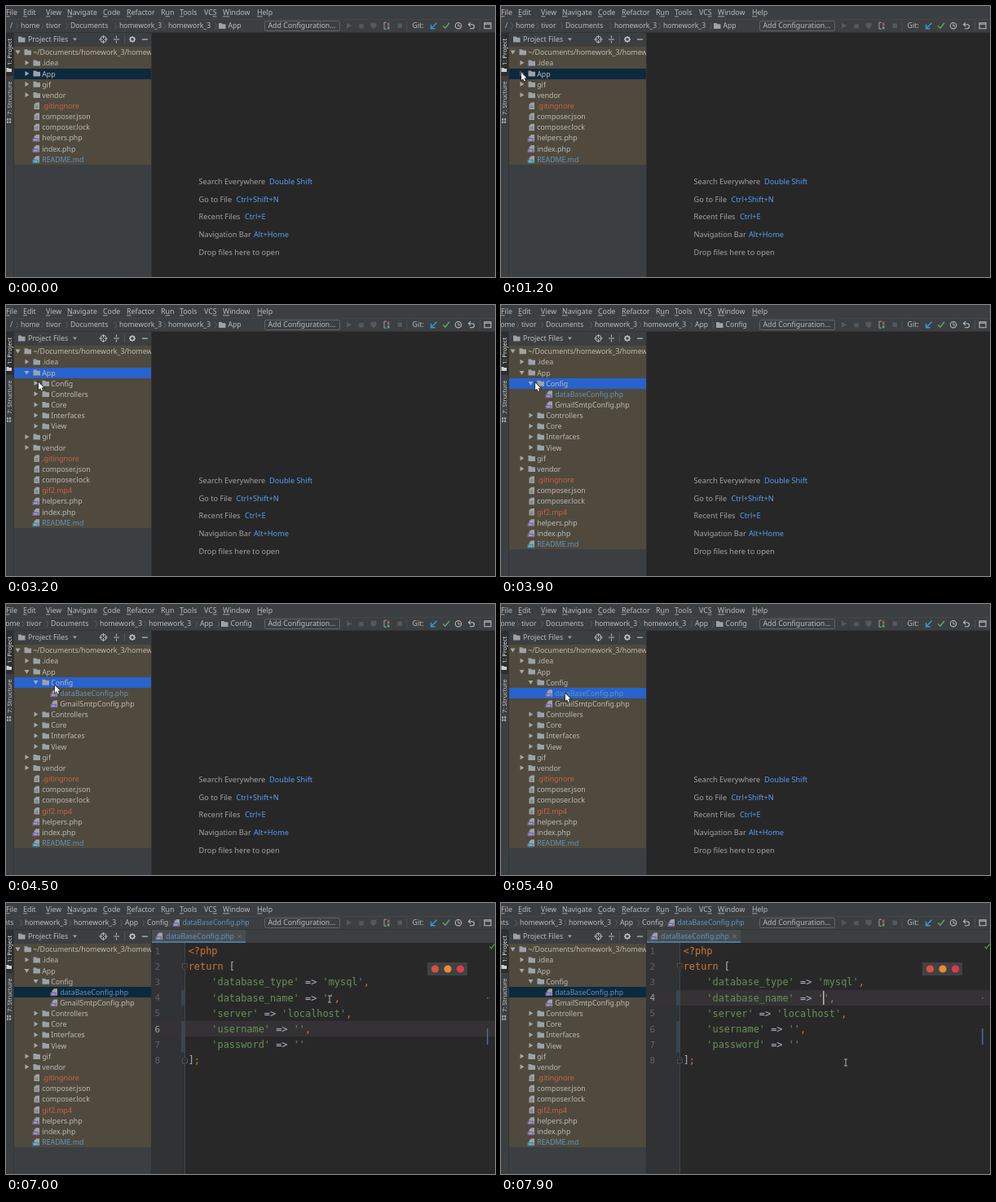
Animation, 600 px wide and 333 px high, one loop 8000 ms. Source, as an HTML page with a canvas:

```html
<!DOCTYPE html>
<html lang="en">
<head>
<meta charset="utf-8">
<title>Project tree and editor</title>
<style>
html, body { margin: 0; width: 600px; height: 333px; overflow: hidden; background: #3c3f41; }
canvas { display: block; }
</style>
</head>
<body>
<canvas id="stage" width="600" height="333"></canvas>
<script>
const g = document.getElementById('stage').getContext('2d');
const LOOP = 8000;
const UI = '"Noto Sans", "Open Sans", sans-serif';
const MONO = '"DejaVu Sans Mono", "Noto Sans Mono", monospace';
const PANEL = '#3c3f41', EDITOR = '#292829', GREY = '#bbbbbb', ICON = '#9da2a6', DIM = '#606366',
      BLUE = '#6194bf', RED = '#cc6049', LINK = '#589df6', PURPLE = '#7b68a8';

// Moments at which the interface changes
const T = { openApp: 1400, newFile: 2800, openConfig: 3700, pickFile: 5100,
            openEditor: 5500, fileCrumb: 5900, popup: 6300, clickLine4: 7450 };

// Pointer waypoints: time, x, y
const POINTER = [
  [700, -12, 96], [1200, 25, 82], [2500, 25, 82], [3000, 40, 95], [3800, 40, 95],
  [4300, 60, 100], [4600, 60, 100], [5000, 79, 110], [5900, 79, 110],
  [6800, 397, 118], [7500, 397, 118], [7850, 423, 196]
];

function rect(x, y, w, h, c) { g.fillStyle = c; g.fillRect(x, y, w, h); }

function text(s, x, mid, c = GREY, size = 8.8, font = UI) {
  g.font = `${size}px ${font}`;
  g.fillStyle = c;
  g.fillText(s, x, mid + size * 0.35);
}

function shape(d, x, y, c, line = 0) {
  g.save();
  g.translate(x, y);
  const p = new Path2D(d);
  if (line) { g.strokeStyle = c; g.lineWidth = line; g.stroke(p); }
  else { g.fillStyle = c; g.fill(p); }
  g.restore();
}

function disc(x, y, r, c, line = 0) {
  g.beginPath();
  g.arc(x, y, r, 0, 7);
  if (line) { g.strokeStyle = c; g.lineWidth = line; g.stroke(); }
  else { g.fillStyle = c; g.fill(); }
}

function clipped(x, y, w, h, draw) {
  g.save();
  g.beginPath();
  g.rect(x, y, w, h);
  g.clip();
  draw();
  g.restore();
}

const folder = (x, y) => shape('M0-3.5H3.5L4.5-2.3H8.5V3.5H0Z', x, y, ICON);

function file(x, y, badge) {
  shape('M4-4.5H8V4H1.5V-2Z', x, y, ICON);
  if (badge) {
    rect(x - 0.5, y, 7.5, 4.5, badge);
    rect(x + 1, y + 1.7, 4.5, 1, '#c9c3d6');
  } else {
    rect(x + 3, y - 0.5, 3.5, 0.8, '#66696b');
    rect(x + 3, y + 1.5, 3.5, 0.8, '#66696b');
  }
}

function drawMenu() {
  const items = [['File', 0], ['Edit', 21], ['View', 49], ['Navigate', 75], ['Code', 119],
    ['Refactor', 148], ['Run', 190, 1], ['Tools', 213], ['VCS', 243, 2], ['Window', 266], ['Help', 308]];
  for (const [s, x, key = 0] of items) {
    text(s, x, 8);
    const left = g.measureText(s.slice(0, key)).width;
    rect(x + left, 12.5, g.measureText(s[key]).width, 0.8, GREY);
  }
  rect(0, 16, 600, 1, '#434648');
}

function drawCrumbs(t) {
  const names = ['/', 'home', 'tivor', 'Documents', 'homework_3', 'homework_3', 'App', 'Config', 'dataBaseConfig.php'];
  const xs = [5, 18, 49, 79, 139, 199, 262, 289, 322];
  const [count, shift, icon] = t < T.openConfig ? [7, 0, folder]
    : t < T.openEditor ? [8, -24, folder]
    : t < T.fileCrumb ? [8, -13, null]
    : [9, -116, (x, y) => file(x, y, PURPLE)];
  clipped(0, 17, 314, 15, () => {
    for (let i = 0; i < count; i++) {
      const x = xs[i] + shift, last = i === count - 1 && icon;
      if (i) shape('M0-4L2.2 0L0 4', x - 5.5, 24.5, '#606467', 0.8);
      if (last) icon(x - 1, 24.5);
      text(names[i], x + (last ? 10.5 : 0), 24.3, i === 8 ? BLUE : GREY, 8.6);
    }
  });
}

function drawToolbar() {
  g.strokeStyle = '#626567';
  g.lineWidth = 1;
  g.beginPath();
  g.roundRect(317.5, 18.5, 92, 12, 2);
  g.stroke();
  text('Add Configuration...', 321.5, 24.2);
  const off = '#55595c';
  shape('M-3-3.5L3.5 0L-3 3.5Z', 421, 24.2, off);
  disc(436, 24.7, 2.8, off);
  shape('M-3.5-3L3.5 3M3.5-3L-3.5 3M-3.5 0H3.5', 436, 24.7, off, 0.8);
  shape('M-3.5-3.5H3.5V1L0 4L-3.5 1Z', 451, 24.2, off);
  shape('M-3-4V4M-3-4H0M-3 4H0', 467, 24.2, ICON, 1);
  rect(468, 20.5, 2.5, 4, '#a85a56');
  rect(468, 25.5, 2.5, 3, '#59a869');
  rect(480.5, 21.5, 5.5, 5.5, off);
  rect(491.5, 19, 1, 11, '#4b4f51');
  text('Git:', 498.5, 24.2);
  shape('M3.5-3.5L-3 3M-3.5-1.5V3.5H1.5', 525, 24.2, '#3c9ad6', 1.4);
  shape('M-4 0L-1 3L4-3.5', 540, 24.2, '#5aa85c', 1.5);
  disc(555, 24.2, 3.7, GREY, 1.1);
  shape('M0-2.5V.5H2.2', 555, 24.2, GREY, 1);
  shape('M-3.5-1.5H1A2.5 2.5 0 0 1 1 3.5H-2M-1-4L-3.5-1.5L-1 1', 571, 24.2, GREY, 1.1);
  rect(581, 19, 1, 11, '#4b4f51');
  shape('M-4-3.5H4V3.5H-4ZM-4-2H4', 591, 24.2, GREY, 1.1);
  rect(0, 32, 600, 1, '#323435');
}

function sideLabel(s, bottom, c) {
  g.save();
  g.translate(4, bottom);
  g.rotate(-Math.PI / 2);
  text(s, 0, 0, c, 7.6);
  g.restore();
}

function drawSidebar() {
  rect(0, 33, 9, 53, '#2c2e2f');
  sideLabel('1: Project', 73, '#e6e6e6');
  shape('M0-2.5H2.5L3.3-1.5H6.5V2.5H0Z', 0.5, 78.5, '#d0d0d0');
  sideLabel('7: Structure', 134, '#c8c8c8');
  for (const [x, y] of [[1, 138], [4, 138], [1, 141.5], [4, 141.5]]) rect(x, y, 2.2, 2.5, ICON);
  rect(9, 33, 1, 300, '#323435');
}

function drawPanelHead() {
  folder(15, 41);
  text('Project Files', 27, 41);
  shape('M-2.5-1.5H2.5L0 1.8Z', 84.5, 41, ICON);
  disc(119.5, 41, 3.7, GREY, 1);
  shape('M-5 0H-1M1 0H5M0-5V-1M0 1V5', 119.5, 41, GREY, 1);
  shape('M-3.5 0H3.5M0-4.5V-1.5M0 4.5V1.5', 135.5, 41, GREY, 1);
  rect(145, 36, 1, 10, '#515456');
  disc(155, 41, 2.5, GREY, 1.6);
  shape('M-4 0H-2.5M4 0H2.5M0-4V-2.5M0 4V2.5M-2.8-2.8L-2-2M2.8 2.8L2 2M-2.8 2.8L-2 2M2.8-2.8L2-2', 155, 41, GREY, 1.3);
  rect(167, 40.5, 7, 1.2, GREY);
}

// Row: label, depth, kind, text colour, expanded
function treeRows(t) {
  const rows = [['~/Documents/homework_3/homework_3', 0, 'dir', GREY, true], ['.idea', 1, 'dir'],
                ['App', 1, 'dir', GREY, t >= T.openApp]];
  if (t >= T.openApp) {
    const config = t >= T.openConfig;
    rows.push(['Config', 2, 'dir', GREY, config]);
    if (config) rows.push(['dataBaseConfig.php', 3, 'php', BLUE], ['GmailSmtpConfig.php', 3, 'php']);
    for (const s of ['Controllers', 'Core', 'Interfaces', 'View']) rows.push([s, 2, 'dir']);
  }
  rows.push(['gif', 1, 'dir'], ['vendor', 1, 'dir'], ['.gitingnore', 1, 'txt', RED],
            ['composer.json', 1, 'txt'], ['composer.lock', 1, 'txt']);
  if (t >= T.newFile) rows.push(['gif2.mp4', 1, 'txt', RED]);
  rows.push(['helpers.php', 1, 'php'], ['index.php', 1, 'php'], ['README.md', 1, 'md', BLUE]);
  return rows;
}

function drawTree(t) {
  const step = 13.16, rows = treeRows(t);
  const chosen = t < T.openConfig ? 'App' : t < T.pickFile ? 'Config' : 'dataBaseConfig.php';
  const focused = t >= T.openApp && t < T.openEditor;
  const badges = { php: PURPLE, md: '#3d8fb0' };
  clipped(10, 50, 168, 283, () => {
    rect(10, 50, 168, Math.round(rows.length * step), '#4f4a3d');
    rows.forEach(([label, depth, kind, color = GREY, open], i) => {
      const y = 57.1 + i * step, x = 22 + depth * 11;
      if (label === chosen) rect(10, Math.round(y - 6.6), 168, 13, focused ? '#2862cc' : '#0d293e');
      if (kind === 'dir') {
        shape(open ? 'M-3-2H3L0 2.8Z' : 'M-2-3L2.8 0L-2 3Z', x - 7.5, y - 0.5, '#a5a7a8');
        folder(x + 0.5, y - 0.3);
      } else file(x, y, badges[kind]);
      text(label, x + 11.2, y, color);
    });
  });
  rect(178, 33, 1, 300, '#2f3132');
}

function drawHints() {
  rect(179, 33, 421, 300, '#272727');
  const hints = [['Search Everywhere', 'Double Shift', 323], ['Go to File', 'Ctrl+Shift+N', 282.5],
    ['Recent Files', 'Ctrl+E', 293], ['Navigation Bar', 'Alt+Home', 304], ['Drop files here to open']];
  hints.forEach(([label, key, x], i) => {
    const y = 216 + i * 21.6;
    text(label, 236.5, y, '#a3a3a3', 9.2);
    if (key) text(key, x, y, LINK, 9.2);
  });
}

const CODE = ['<?php', 'return [', "    'database_type' => 'mysql',", "    'database_name' => '',",
  "    'server' => 'localhost',", "    'username' => '',", "    'password' => ''", '];'];
const PITCH = 7.165, CODE_X = 223.7;
const lineY = n => 59 + (n - 1) * 19.15;

function drawCode(s, y) {
  let col = 0;
  for (const part of s.split(/('[^']*'|,|;|<\?php|return)/)) {
    const color = part[0] === "'" ? '#6a8f59' : /^(,|;|<|return)/.test(part) ? '#cc7832' : '#a9b7c6';
    text(part, CODE_X + col * PITCH, y, color, 11.9, MONO);
    col += part.length;
  }
}

function drawEditor(t) {
  const clicked = t >= T.clickLine4;
  const current = clicked ? 4 : 6;
  rect(179, 33, 421, 16, PANEL);
  rect(179, 33, 115, 16, '#484c4e');
  rect(179, 47, 115, 2, '#4a7a9c');
  file(184, 41, PURPLE);
  text('dataBaseConfig.php', 196, 41, BLUE);
  shape('M-2-2L2 2M2-2L-2 2', 286.5, 41, '#777b7e', 0.8);

  rect(179, 49, 421, 284, EDITOR);
  rect(179, 49, 40, 284, '#303234');
  rect(179, Math.round(lineY(current) - 9.5), 421, 19, '#343234');
  rect(215, lineY(4) - 9.5, 4, 19.2, '#374752');
  rect(215, lineY(6) - 9.5, 4, 38.3, '#374752');
  rect(219, 49, 1, 284, '#424547');
  for (const [n, d] of [[2, 'M-3-3.5H3V1L0 4L-3 1Z'], [8, 'M-3 3.5H3V-1L0-4L-3-1Z']]) {
    shape(d, 219.5, lineY(n), EDITOR);
    shape(d + 'M-1.5 0H1.5', 219.5, lineY(n), '#585b5d', 0.8);
  }
  CODE.forEach((s, i) => {
    const y = lineY(i + 1);
    text(String(i + 1), 182.5, y, i + 1 === current ? '#a4a3a3' : DIM, 11, MONO);
    drawCode(s, y);
  });

  // The caret blinks every half second, restarting on a click
  const since = t - (clicked ? T.clickLine4 : T.openEditor);
  if (since % 1000 < 500) {
    const col = CODE[current - 1].indexOf("''") + 1;
    rect(CODE_X + col * PITCH - 0.5, lineY(current) - 8.5, 1.3, 17, '#d0d0d0');
  }

  rect(590, 154, 1.5, 20, '#4a6a9a');
  rect(590, 116, 2, 1.5, '#4a6a9a');
  if (t < T.fileCrumb) {
    shape('M-3 0Q0-4 3 0Q0 4-3 0Z', 596.5, 53.5, ICON, 0.9);
    disc(596.5, 53.5, 1, ICON);
  } else shape('M-3 0L-1 2.5L3-3', 596.5, 53.5, '#4f8f4a', 1.3);

  if (t >= T.popup) {
    rect(517, 73, 49, 16, '#3f4244');
    ['#d9503f', '#f08a2c', '#e0394a'].forEach((c, i) => disc(526.5 + i * 15.5, 81, 4.6, c));
  }
}

function drawPointer(t) {
  if (t < POINTER[0][0]) return;
  let i = POINTER.findIndex(p => p[0] > t);
  if (i < 0) i = POINTER.length;
  const a = POINTER[i - 1], b = POINTER[i] || a;
  const k = b === a ? 0 : (t - a[0]) / (b[0] - a[0]);
  const e = k * k * (3 - 2 * k);
  const x = a[1] + (b[1] - a[1]) * e, y = a[2] + (b[2] - a[2]) * e;
  if (x > 220) {
    shape('M-2-4H2M0-4V4M-2 4H2', x, y, '#bcbcbc', 0.9);
  } else {
    const arrow = 'M0 0V9L2 7.2L3.6 10.4L5 9.7L3.6 6.6H6.5Z';
    shape(arrow, x, y, '#1c1c1c', 1.4);
    shape(arrow, x, y, '#ffffff');
  }
}

function draw(t) {
  rect(0, 0, 600, 333, PANEL);
  drawMenu();
  drawCrumbs(t);
  drawToolbar();
  drawSidebar();
  drawPanelHead();
  drawTree(t);
  if (t < T.openEditor) drawHints();
  else drawEditor(t);
  drawPointer(t);
}

const start = performance.now();
function frame() {
  draw((performance.now() - start) % LOOP);
  requestAnimationFrame(frame);
}
frame();
</script>
</body>
</html>
```
